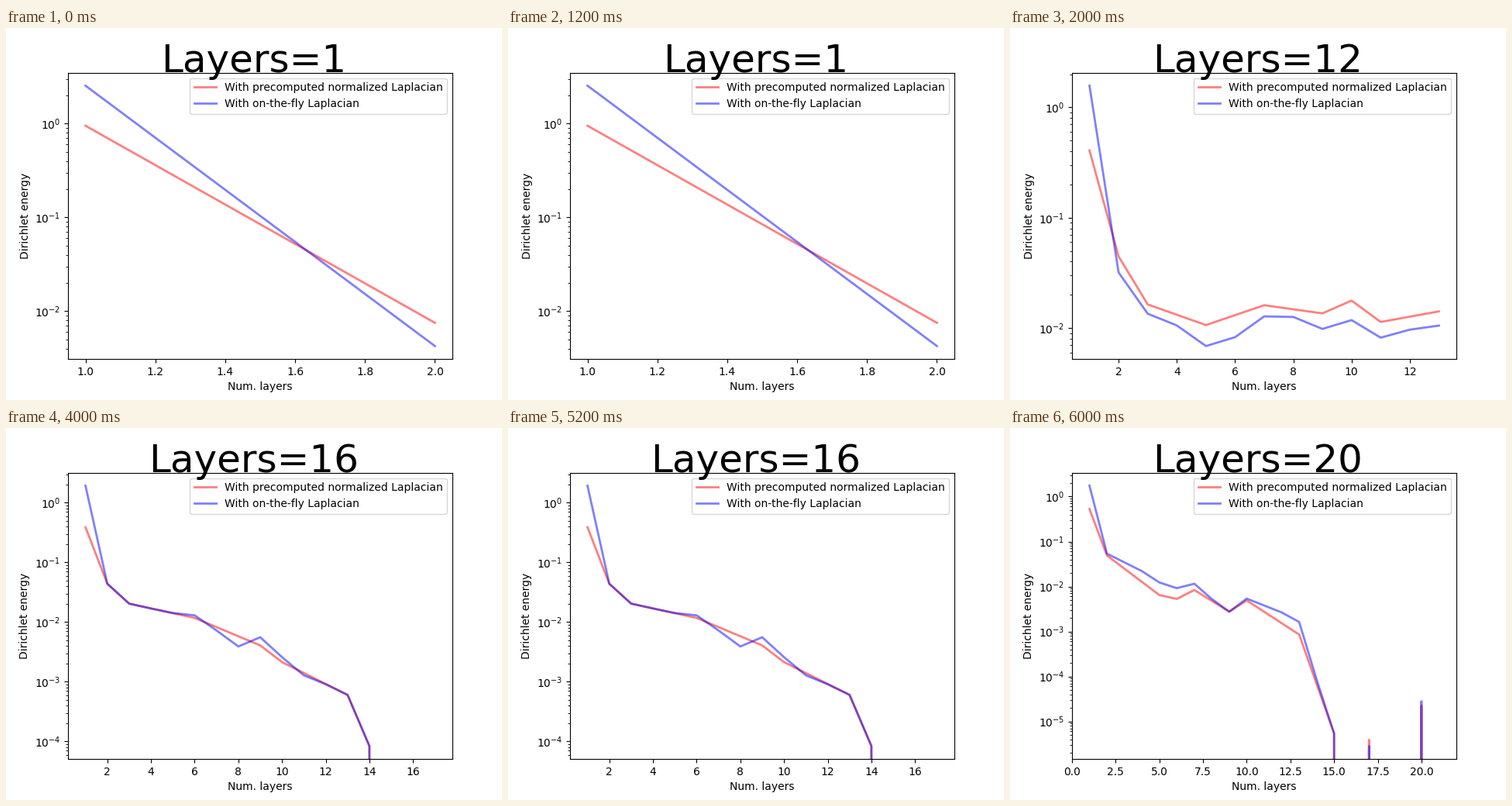
Animation, 640 px wide and 480 px high, one loop 8 s. Source, as a matplotlib script:

```python
from itertools import chain

import matplotlib.pyplot as plt
import numpy as np
from matplotlib.animation import FuncAnimation

# All energies are log10. "trend" holds the corners (layer, energy) of the
# precomputed curve; past the last corner only isolated spikes are non-zero.
# The on-the-fly curve has its own start, then follows the trend with an
# offset and a wave packet (height, centre, width, crest, period).
RUNS = [
    dict(depth=1, start=0.405, offset=-0.248, wave=(0, 1, 1, 1, 1),
         trend=[(1, -0.022), (2, -2.123)]),
    dict(depth=12, start=0.197, offset=-0.135, wave=(0.08, 6, 5, 3.3, 4.5),
         trend=[(1, -0.389), (2, -1.351), (3, -1.786), (5, -1.973), (7, -1.793),
                (9, -1.867), (10, -1.751), (11, -1.945), (13, -1.849)]),
    dict(depth=16, start=0.287, offset=0, wave=(0.22, 8.5, 2, 9.5, 3.7),
         trend=[(1, -0.409), (2, -1.357), (3, -1.69), (6, -1.93), (9, -2.39),
                (10, -2.67), (13, -3.22), (14, -4.077)]),
    dict(depth=20, start=0.243, offset=0.14, wave=(0.14, 10, 99, 5, 8),
         trend=[(1, -0.276), (2, -1.31), (5, -2.19), (6, -2.276), (7, -2.078),
                (9, -2.56), (10, -2.31), (13, -3.069), (15, -5.27)],
         spikes=[(17, -5.41), (20, -4.65)]),
]
COLLAPSE = -3.5  # below this level the constant offset disappears

plt.rcParams["font.family"] = "DejaVu Sans"
fig, ax = plt.subplots(figsize=(6.4, 4.8), dpi=100)
title = fig.suptitle("", y=0.96, fontsize=36)


def trend_curve(run, layers):
    corners, levels = zip(*run["trend"])
    curve = np.interp(layers, corners, levels, right=-np.inf)
    for layer, level in run.get("spikes", []):
        curve[layer - 1] = level
    return curve


def wave_packet(layers, height, centre, width, crest, period):
    envelope = np.exp(-((layers - centre) / width) ** 2)
    return height * envelope * np.cos(2 * np.pi * (layers - crest) / period)


def on_the_fly_curve(run, layers, trend):
    offset = np.where(trend > COLLAPSE, run["offset"], 0)
    curve = trend + offset + wave_packet(layers, *run["wave"])
    curve[0] = run["start"]
    return curve


def plot_energy(layers, level, color, label):
    ax.semilogy(layers, 10.0 ** level, color=color, alpha=0.5, linewidth=2,
                label=label)


def draw(index):
    run = RUNS[index]
    layers = np.arange(1, run["depth"] + 2)
    trend = trend_curve(run, layers)
    ax.clear()
    plot_energy(layers, trend, "red", "With precomputed normalized Laplacian")
    plot_energy(layers, on_the_fly_curve(run, layers, trend), "blue",
                "With on-the-fly Laplacian")
    ax.set_xlabel("Num. layers")
    ax.set_ylabel("Dirichlet energy")
    ax.legend(loc="upper right")
    title.set_text(f"Layers={run['depth']}")


animation = FuncAnimation(fig, draw, frames=len(RUNS), interval=2000,
                          repeat=True, repeat_delay=0)
plt.show()
```
